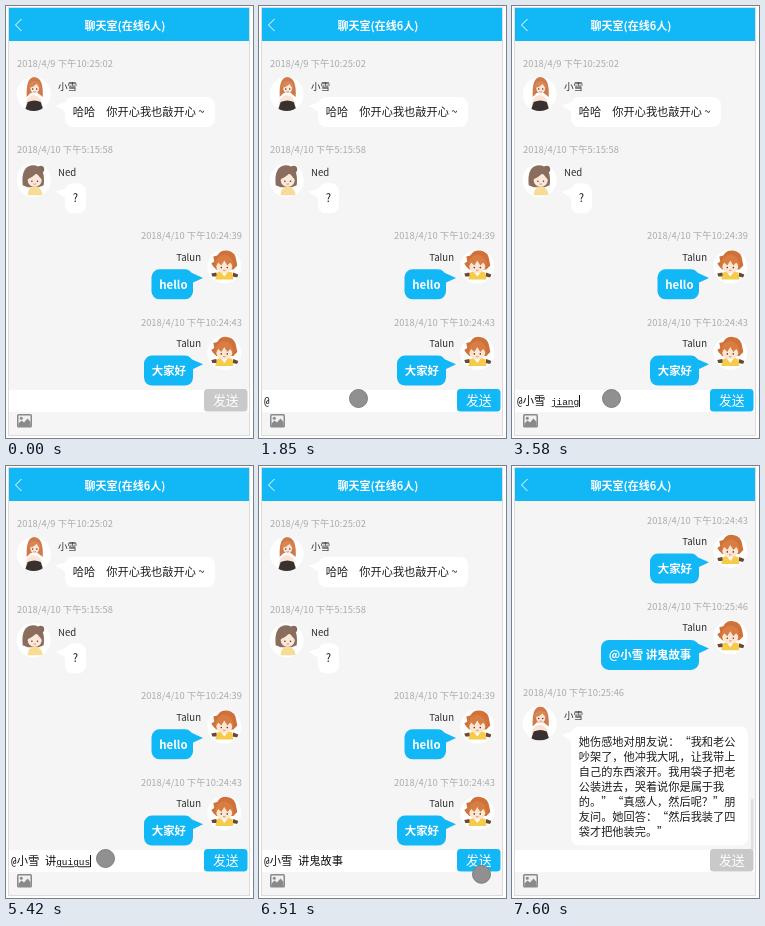
Animation, 247 px wide and 432 px high, one loop 8530 ms. Source, as an HTML page:

```html
<!DOCTYPE html>
<html lang="zh-CN">
<head>
<meta charset="utf-8">
<title>聊天室</title>
<style>
  html, body { margin: 0; width: 100%; height: 100%; overflow: hidden; background: #fff; }
  svg { display: block; font-family: "Noto Sans CJK SC", "Noto Sans CJK", sans-serif; }
  text { white-space: pre; text-spacing-trim: space-all; }
  .date { font-size: 9.4px; font-weight: 500; fill: #ababab; }
  .name { font-size: 9.6px; fill: #2c2c2c; }
  .body { font-size: 11.2px; fill: #1d1d1d; }
  .mine { font-size: 11.4px; font-weight: 700; fill: #fff; }
  .end { text-anchor: end; }
  #input { font: 11.3px "Noto Sans Mono CJK SC", "Noto Sans CJK SC", monospace; fill: #111; }
  #compose { font: 9.42px "Liberation Mono", monospace; text-decoration: underline; }
</style>
</head>
<body>
<svg width="247" height="432" viewBox="0 0 247 432">
  <defs>
    <clipPath id="view"><rect x="3" y="35" width="240" height="349"/></clipPath>
    <clipPath id="round"><circle r="17"/></clipPath>
  </defs>
  <rect x="2.5" y="1.5" width="241" height="428" fill="#f5f5f5" stroke="#dcdcdc"/>
  <g clip-path="url(#view)"><g id="list"></g></g>
  <rect id="bar" x="239" width="2.4" rx="1" fill="#858585"/>

  <rect x="3" y="2" width="240" height="33" fill="#12b7f5"/>
  <path d="M15.500 13 9.500 19 15.500 25" fill="none" stroke="#fff" stroke-width="1"/>
  <text x="119" y="24" text-anchor="middle" font-size="11" font-weight="700" fill="#fff">聊天室(在线6人)</text>

  <rect x="3" y="384" width="240" height="22" fill="#fff"/>
  <g transform="translate(11 408)">
    <rect width="15" height="13.500" rx="1.500" fill="#8a8a8a"/>
    <rect x="1.500" y="1.500" width="12" height="10.500" fill="#f0f0f0"/>
    <circle cx="4.300" cy="4.300" r="1.500" fill="#8a8a8a"/>
    <path d="M1.500 12V9.500L4.500 6.500 7 8.500 10.500 4.500 13.500 8V12Z" fill="#8a8a8a"/>
  </g>
  <text id="input" x="5" y="399.300"><tspan id="done"></tspan><tspan id="compose"></tspan></text>
  <rect id="caret" y="389" width="1" height="12" fill="#111"/>
  <rect id="send" x="198" y="383" width="43.500" height="22.500" rx="3.500"/>
  <text x="219.700" y="398.900" text-anchor="middle" font-size="12.800" fill="#fff">发送</text>
  <circle id="touch" r="9" fill="#909090" stroke="#7e7e7e"/>
</svg>
<script>
const LOOP = 8530, PITCH = 86.3, BLUE = '#12b7f5', GREY = '#c9c9c9';
const $ = id => document.getElementById(id);

// Simple portraits, drawn around the centre of a round frame
const faces = {
  long: `<path d="M-7 3Q-8-17 1-17 10-16 9 3L4-1H-3Z" fill="#d07a4c"/>
    <path d="M-8 13Q-8 2 0 1 8 2 9 13Z" fill="#fbe3d6"/>
    <path d="M-9 17-6 8Q1 5 7 8L10 17Z" fill="#38312f"/>
    <ellipse cx="1" cy="-6" rx="4.500" ry="5.500" fill="#fde6d6"/>
    <path d="M-5-6Q-5-13 1-13 7-12 7-6 4-7 3-10 0-7-5-6Z" fill="#d98755"/>`,
  bun: `<circle cx="7" cy="-11" r="3.500" fill="#84685a"/>
    <path d="M-11 5Q-13-15 0-15 12-14 10 5L5 7H-6Z" fill="#8a6d5e"/>
    <path d="M-6 15Q-6 7 1 6 8 7 9 15Z" fill="#f6dc94"/>
    <ellipse cx="1" cy="0" rx="7" ry="6.500" fill="#fde8d8"/>
    <path d="M-8 0Q-7-11 1-11 9-9 9 0 5-4 3-7-1-3-8 0Z" fill="#8a6d5e"/>`,
  short: `<path d="M-11 0-13-3-10-5-11-10-7-11Q-4-17 3-16 11-15 12-6L13-1 9 3H-8Z" fill="#cf7138"/>
    <path d="M-13 7-8 6-7 10H-12ZM9 6 14 8 13 11 8 10Z" fill="#6b4a35"/>
    <path d="M-9 13-7 6Q0 3 8 6L9 13Z" fill="#f6cb4a"/>
    <path d="M-3 6H3L0 10Z" fill="#fff"/>
    <ellipse cy="0" rx="8" ry="6.500" fill="#fee6d3"/>
    <path d="M-9 0Q-9-11 0-12 9-11 9 0L6-4 3-1 0-6-3-1-6-4Z" fill="#d87e45"/>`
};
const eyes = { long: [1, -5, 2], bun: [1, 1, 2.8], short: [0, 1, 3] };

function portrait(kind) {
  const [x, y, gap] = eyes[kind];
  return `${faces[kind]}<g transform="translate(${x} ${y})">
    <g fill="#54372c"><circle cx="${-gap}" r=".8"/><circle cx="${gap}" r=".8"/></g>
    <path d="M-1.200 2.500Q0 3.500 1.200 2.500" fill="none" stroke="#c2604a" stroke-width=".7"/></g>`;
}

const girl = { name: '小雪', face: 'long' };
const guest = { name: 'Ned', face: 'bun' };
const me = { name: 'Talun', face: 'short', mine: true };
const messages = [
  [girl, '2018/4/9 下午10:25:02', 150, '哈哈　你开心我也敲开心 ~'],
  [guest, '2018/4/10 下午5:15:58', 21, '?'],
  [me, '2018/4/10 下午10:24:39', 41.5, 'hello'],
  [me, '2018/4/10 下午10:24:43', 49, '大家好'],
  [me, '2018/4/10 下午10:25:46', 98, '@小雪 讲鬼故事'],
  [girl, '2018/4/10 下午10:25:46', 177, '她伤感地对朋友说：“我和老公', '吵架了，他冲我大吼，让我带上',
    '自己的东西滚开。我用袋子把老', '公装进去，哭着说你是属于我', '的。”“真感人，然后呢？”朋',
    '友问。她回答：“然后我装了四', '袋才把他装完。”']
];

const label = (x, y, cls, s) => `<text x="${x}" y="${y}" class="${cls}">${s}</text>`;

function message([who, date, width, ...lines], i) {
  const mine = who.mine, end = mine ? ' end' : '';
  const left = mine ? 187 - width : 59;
  const height = 30 + (lines.length - 1) * 14.8;
  const tail = mine ? 'M185 37 197 42.300 185 48Z' : 'M60 39 49.500 42.500 60 49Z';
  return `<g transform="translate(0 ${57 + i * PITCH})">
    ${label(mine ? 236 : 11, 3.6, 'date' + end, date)}
    <g transform="translate(${mine ? 218.3 : 27.7} 31)">
      <circle r="17" fill="#fff"/>
      <g clip-path="url(#round)">${portrait(who.face)}</g>
    </g>
    ${label(mine ? 195 : 52, mine ? 25 : 26.5, 'name' + end, who.name)}
    <g fill="${mine ? BLUE : '#fff'}">
      <path d="${tail}"/>
      <rect x="${left}" y="${mine ? 33.7 : 34}" width="${width}" height="${height}" rx="8"/>
    </g>
    ${lines.map((s, n) => label(left + 7.8, 53 + n * 15.1, mine ? 'mine' : 'body', s)).join('')}
  </g>`;
}
$('list').innerHTML = messages.map(message).join('');
const rows = [...$('list').children];

// Step tables: time, then values held until the next row
const typing = [
  [0, '', '', 0], [730, '', '', 1], [990, '', '', 0],
  [1300, '@', '', 1], [1850, '@', '', 0],
  [2230, '@', 'x', 1], [2400, '@', 'xi', 1], [2480, '@', 'xia', 1], [2550, '@', 'xiao', 1],
  [2700, '@', 'xiaox', 1], [2780, '@', 'xiaoxu', 1], [2860, '@', 'xiaoxue', 1],
  [3010, '@小雪', '', 1], [3160, '@小雪 ', '', 1],
  [3330, '@小雪 ', 'j', 1], [3410, '@小雪 ', 'jia', 1], [3580, '@小雪 ', 'jiang', 1], [4110, '@小雪 ', 'jiang', 0],
  [4410, '@小雪 讲', '', 1],
  [4580, '@小雪 讲', 'g', 1], [4730, '@小雪 讲', 'gu', 1], [4810, '@小雪 讲', 'gui', 1],
  [5190, '@小雪 讲', 'guigu', 1], [5420, '@小雪 讲', 'guigus', 1], [5600, '@小雪 讲', 'guigushi', 1],
  [5650, '@小雪 讲鬼故事', '', 1], [6200, '@小雪 讲鬼故事', '', 0],
  [6660, '', '', 0]
];
const touches = [
  [0, -50, -50], [70, 130.5, 425], [150, 116, 412], [220, 104, 400], [300, 99.5, 395.5],
  [530, 99.5, 394.5], [600, 99.5, 393.5], [730, 99.5, 392.5],
  [6130, 149.5, 392.5], [6200, 176, 394], [6280, 197, 398], [6360, 212, 403], [6430, 220, 407], [6510, 222.5, 408.3],
  [6660, -50, -50]
];
const buttons = [[0, GREY], [1300, '#6ec0df'], [1380, BLUE], [6660, GREY]];
// time, visible messages, scroll, bar top, bar opacity
const views = [
  [0, 4, 0, 328, 0], [6660, 5, 0, 328, 0], [6740, 5, 86.3, 328, 1],
  [7130, 6, 262, 333, 1], [7530, 6, 262, 333, .55], [7600, 6, 262, 333, .2]
];
const at = (table, t) => table.findLast(row => row[0] <= t);
const set = (id, attrs) => { for (const k in attrs) $(id).setAttribute(k, attrs[k]); };

function draw(t) {
  const [, done, compose, caret] = at(typing, t);
  $('done').textContent = done;
  $('compose').textContent = compose;
  const width = done || compose ? $('input').getComputedTextLength() : 0;
  set('caret', { x: Math.round(5 + width - .5), opacity: caret });

  const [, x, y] = at(touches, t);
  set('touch', { cx: x, cy: y });
  set('send', { fill: at(buttons, t)[1] });

  const [, count, scroll, top, alpha] = at(views, t);
  rows.forEach((row, i) => row.setAttribute('visibility', i < count ? 'visible' : 'hidden'));
  set('list', { transform: `translate(0 ${-scroll})` });
  set('bar', { y: top, height: 384 - top, opacity: alpha });
}

const start = performance.now();
function tick() {
  draw((performance.now() - start) % LOOP);
  requestAnimationFrame(tick);
}
tick();
</script>
</body>
</html>
```
